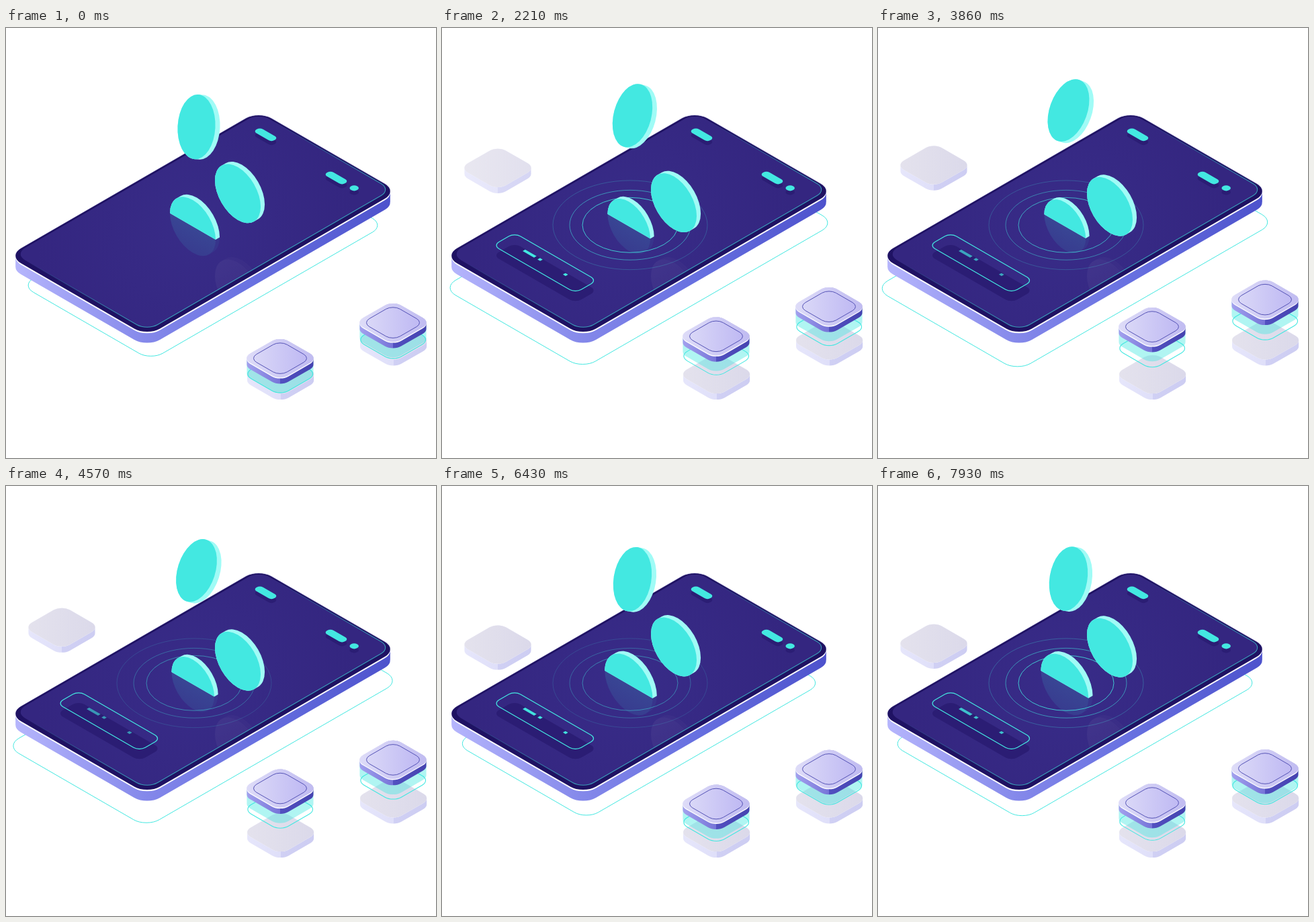
Write an HTML page with a canvas that moves like this. It is 640 px wide and 640 px high and loops after 8 s.

```html
<!DOCTYPE html>
<html lang="en">
<head>
<meta charset="utf-8">
<title>Isometric phone</title>
<style>
html, body { margin: 0; width: 100%; height: 100%; overflow: hidden; background: #fff; }
canvas { display: block; width: 100%; height: 100%; }
</style>
</head>
<body>
<canvas id="stage"></canvas>
<script>
const SIZE = 640, LOOP = 8000, HALF = 3550;
const canvas = document.getElementById('stage');
const ctx = canvas.getContext('2d');
const dpr = window.devicePixelRatio || 1;
canvas.width = canvas.height = SIZE * dpr;

const COS = Math.cos(Math.PI / 6);
const TEAL = '#43e8e1', RIM = '#a0fbf6', SHADE = '#2b1d74';
const teal = a => `rgba(67,232,225,${a})`;
const white = a => `rgba(255,255,255,${a})`;

// Motion: everything floats on one cosine, from a first pose to a peak,
// then between the peak and a resting pose
const easeInOut = u => (1 - Math.cos(Math.PI * u)) / 2;
const easeOut = u => 1 - (1 - u) ** 1.5;
function swing(t, first, peak, rest, rise = easeInOut) {
  return t < HALF
    ? first + (peak - first) * rise(t / HALF)
    : peak + (rest - peak) * easeInOut(t / HALF - 1);
}
const ramp = (t, from, to) => Math.min(1, Math.max(0, (t - from) / (to - from)));
const pulse = (t, mid, amp, peak, period) => mid + amp * Math.cos(2 * Math.PI * (t - peak) / period);

// Rounded rectangle lying on the floor, centred at x, y
function flat(x, y, w, l, r) {
  const path = new Path2D(), rect = new Path2D();
  rect.roundRect(-w / 2, -l / 2, w, l, r);
  path.addPath(rect, new DOMMatrix([COS, .5, -COS, .5, x, y]));
  return path;
}

// Silhouette of the same rectangle pulled down by h
function prism(x, y, w, l, r, h) {
  const path = flat(x, y, w, l, r);
  path.addPath(flat(x, y + h, w, l, r));
  const half = COS * (w + l) / 2 - .507 * r, dy = (l - w) / 4;
  path.moveTo(x - half, y + dy);
  path.lineTo(x + half, y - dy);
  path.lineTo(x + half, y - dy + h);
  path.lineTo(x - half, y + dy + h);
  path.closePath();
  return path;
}

function gradient(x0, y0, x1, y1, ...stops) {
  const g = ctx.createLinearGradient(x0, y0, x1, y1);
  stops.forEach(([p, c]) => g.addColorStop(p, c));
  return g;
}

function fill(path, style, alpha = 1) {
  ctx.globalAlpha = alpha;
  ctx.fillStyle = style;
  ctx.fill(path);
  ctx.globalAlpha = 1;
}

function line(path, style, width = 1, alpha = 1) {
  ctx.globalAlpha = alpha;
  ctx.strokeStyle = style;
  ctx.lineWidth = width;
  ctx.stroke(path);
  ctx.globalAlpha = 1;
}

// Coin in local space: rim as a thick round stroke, then the face
function coin(r, dx, dy, face, rim) {
  ctx.lineCap = 'round';
  ctx.lineWidth = 2 * r;
  ctx.strokeStyle = rim;
  ctx.beginPath();
  ctx.moveTo(0, 0);
  ctx.lineTo(dx, dy);
  ctx.stroke();
  ctx.fillStyle = face;
  ctx.beginPath();
  ctx.arc(0, 0, r, 0, 7);
  ctx.fill();
}

const R = 39.3, THICK = 7;
function wallCoin(x, y, s, face, rim, clip) {
  ctx.save();
  ctx.transform(COS * s, .5 * s, 0, s, x, y);
  if (clip) {
    ctx.beginPath();
    [[-60, -70], [-60, 0], [R, 0], [R + 14, -14], [R + 14, -70]].forEach(p => ctx.lineTo(...p));
    ctx.clip();
  }
  coin(R, THICK, -THICK, face, rim);
  ctx.restore();
}

function tiltedCoin(top) {
  const rx = 28, ry = 48.2;
  const angle = (3 + (99 - top) * .74) * Math.PI / 180;
  const rise = Math.hypot(ry * Math.cos(angle), rx * Math.sin(angle));
  ctx.save();
  ctx.translate(283.5, top + rise);
  ctx.rotate(angle);
  ctx.scale(rx, ry);
  coin(1, THICK / rx, 0, TEAL, RIM);
  ctx.restore();
}

const phone = [293, 290.5, 239, 430.7, 22];
const screen = flat(293.2, 288.5, 228, 420, 18);

function drawFloorLine(t) {
  const left = swing(t, 33, 5.6, 32.5, easeOut), s = (293 - left) / 279;
  line(flat(293, 338.3, 239 * s, 430.7 * s, 22 * s), TEAL, 1);
}

function drawPhone() {
  const [x, y, ...dims] = phone;
  fill(prism(x, y, ...dims, 17), gradient(14, 0, 572, 0,
    [0, '#b5b5fc'], [.35, '#8488ea'], [.65, '#6770e0'], [1, '#4d52cc']));
  fill(prism(x, y, ...dims, 2.7), '#fff');
  fill(flat(x, y + .5, ...dims), '#1f1263');
  const glow = ctx.createRadialGradient(280, 293, 0, 280, 293, 240);
  glow.addColorStop(0, '#382c88');
  glow.addColorStop(1, '#342680');
  fill(screen, glow);
  line(screen, gradient(150, 260, 244, 423, [.08, teal(0)], [1, teal(.62)]), 1.1);
}

function pill(x, y, w, l, r) {
  fill(flat(x, y + 6, w, l, r), SHADE);
  fill(flat(x, y, w, l, r), TEAL);
}

function drawScreen(t) {
  pill(386.5, 158.8, 31.5, 11.5, 5.5);
  pill(491.5, 223, 31.5, 11.5, 5.5);
  pill(518.2, 238.3, 11, 11, 5.5);

  const glow = pulse(t, .6, .25, 2700, 5700);
  [71, 90, 115].forEach((rx, i) => {
    const ring = new Path2D(), start = 200 + 450 * i;
    ring.ellipse(280, 293.3, rx, rx * .577, 0, 0, 7);
    line(ring, TEAL, 1, glow * (1 - .33 * i) * ramp(t, start, start + 1300));
  });

  const box = [141.5, 37, 10];
  fill(flat(153.3, 364.6, ...box), SHADE, ramp(t, 300, 1200));
  line(flat(153.3, 349.6, ...box), TEAL, 1.2, ramp(t, 500, 1700));
  const bars = ramp(t, 1700, 2200) * pulse(t, .8, .2, 2210, 4600);
  [[130.4, 335.7, 19.6], [146, 344.6, 4.6], [183.8, 366.9, 4.6]].forEach(
    ([x, y, w]) => fill(flat(x, y, w, 4.4, 0), TEAL, bars));

  ctx.save();
  ctx.clip(screen);
  wallCoin(345, 388.4, 1, gradient(-R, -R, R, R, [0, white(.035)], [.8, white(0)]), white(.02));
  ctx.restore();
}

function drawCoins(t) {
  const s = swing(t, 1, .905, 1.06), x = 281 - 3 * s, y = 293.3 + 2 * s;
  const sunk = gradient(0, -10, 0, R, [0, teal(.1)], [1, teal(.04)]);
  wallCoin(x, y, s, sunk, teal(.05));
  wallCoin(x, y, s, TEAL, RIM, true);
  wallCoin(345, swing(t, 246.4, 266.3, 237), 1, TEAL, RIM);
  tiltedCoin(swing(t, 99, 76, 92.3));
}

const TILE = [65.4, 65.4, 14];
const across = (x, ...stops) => gradient(x - 50, 0, x + 50, 0, ...stops);

function ghost(x, y, alpha = 1) {
  const top = flat(x, y, ...TILE);
  fill(prism(x, y, ...TILE, 9), across(x,
    [0, '#e6e6fb'], [.5, '#dfdff9'], [.5, '#d0d0f4'], [1, '#cdcdf2']), alpha);
  fill(top, '#fff');
  fill(top, across(x, [0, '#e4e2ed'], [1, '#dbd9ea']), alpha);
}

function slab(x, y) {
  fill(prism(x, y, ...TILE, 9.3), across(x,
    [0, '#a3a1ee'], [.5, '#7674d8'], [.5, '#5250c0'], [1, '#4543b0']));
  fill(prism(x, y, ...TILE, 1.4), '#fff');
  fill(flat(x, y, ...TILE), across(x, [0, '#dedcf8'], [1, '#c0bbf1']));
  const inner = flat(x, y, 52.6, 52.6, 12);
  fill(inner, across(x, [.1, '#dad8f7'], [.9, '#bfb9f3']));
  line(inner, '#5553b6', 1);
}

function stack(x, base, y, lineY) {
  ghost(x + .6, base);
  fill(prism(x, y + 5, ...TILE, 18), teal(.42));
  line(flat(x + .2, lineY, 64, 64, 14), TEAL, 1.1);
  slab(x, y);
}

function draw(t) {
  ctx.setTransform(dpr, 0, 0, dpr, 0, 0);
  ctx.fillStyle = '#fff';
  ctx.fillRect(0, 0, SIZE, SIZE);
  drawFloorLine(t);
  ghost(83, swing(t, 219, 203.5, 239), ramp(t, 860, 2500));
  drawPhone();
  drawScreen(t);
  drawCoins(t);
  stack(408, 515.5, swing(t, 491.6, 444, 475.7), swing(t, 515, 476.3, 502.8));
  stack(576, 464.9, swing(t, 438.6, 403.8, 423), swing(t, 464, 436, 447.3));
}

const start = performance.now();
function tick() {
  draw((performance.now() - start) % LOOP);
  requestAnimationFrame(tick);
}
tick();
</script>
</body>
</html>
```
